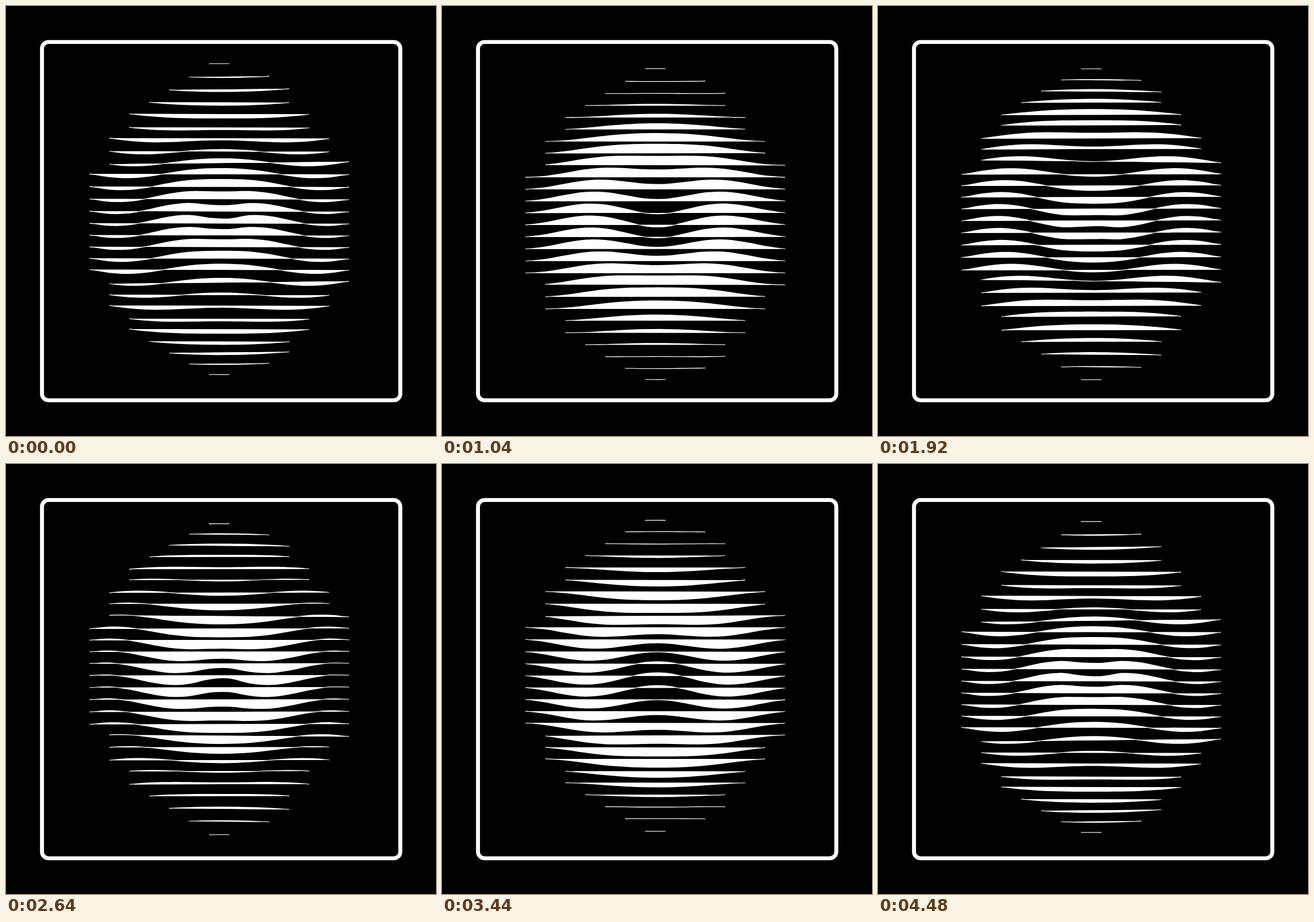
Write an HTML page without scripts that moves like this. It is 748x748 px and loops after 4520 ms.

```html
<!DOCTYPE html>
<html lang="en">
<head>
<meta charset="utf-8">
<title>Ripple lines</title>
<style>
@property --t { syntax: "<angle>"; inherits: true; initial-value: 0deg; }
@property --c0 { syntax: "<length>"; inherits: true; initial-value: 0px; }
@property --c1 { syntax: "<length>"; inherits: true; initial-value: 0px; }
@property --c2 { syntax: "<length>"; inherits: true; initial-value: 0px; }
@property --c3 { syntax: "<length>"; inherits: true; initial-value: 0px; }
@property --c4 { syntax: "<length>"; inherits: true; initial-value: 0px; }
@property --c5 { syntax: "<length>"; inherits: true; initial-value: 0px; }
@property --c6 { syntax: "<length>"; inherits: true; initial-value: 0px; }
@property --c7 { syntax: "<length>"; inherits: true; initial-value: 0px; }
@property --c8 { syntax: "<length>"; inherits: true; initial-value: 0px; }
@property --c9 { syntax: "<length>"; inherits: true; initial-value: 0px; }
@property --c10 { syntax: "<length>"; inherits: true; initial-value: 0px; }
@property --c11 { syntax: "<length>"; inherits: true; initial-value: 0px; }
@property --c12 { syntax: "<length>"; inherits: true; initial-value: 0px; }
@property --c13 { syntax: "<length>"; inherits: true; initial-value: 0px; }
@property --left { syntax: "<length>"; inherits: true; initial-value: 0px; }
@property --right { syntax: "<length>"; inherits: true; initial-value: 0px; }

html, body { margin: 0; width: 100%; height: 100%; overflow: hidden; background: #000; }
body { position: relative; animation: ripple 4520ms steps(113) infinite; }
@keyframes ripple { from { --t: 0deg; } to { --t: 360deg; } }

svg { position: absolute; left: 0; top: 0; }
rect { fill: none; stroke: #fff; stroke-width: 6.9px; }

/* One row: n = row number, f and l = first and last column */
i {
  --y: calc((var(--n) - 13) * 20.8);
  --k: .02523rad;
  --amp: .0173px;
  --xf: calc(var(--f) * 34.68 - 228.5);
  --xl: calc(var(--l) * 34.68 - 228.5);
  position: absolute; left: 145.5px; width: 450.84px; height: 60px;
  top: calc(344.2px + var(--y) * 1px);
  clip-path: inset(0 calc((13 - var(--l)) * 34.68px - .4px) 0 calc(var(--f) * 34.68px - .4px));

  /* Height of the wave at each column, fading with distance */
  --c0: calc(30px + (648 - hypot(-228.5, var(--y))) * var(--amp) * sin(var(--t) - var(--k) * hypot(-228.5, var(--y))));
  --c1: calc(30px + (648 - hypot(-193.82, var(--y))) * var(--amp) * sin(var(--t) - var(--k) * hypot(-193.82, var(--y))));
  --c2: calc(30px + (648 - hypot(-159.14, var(--y))) * var(--amp) * sin(var(--t) - var(--k) * hypot(-159.14, var(--y))));
  --c3: calc(30px + (648 - hypot(-124.46, var(--y))) * var(--amp) * sin(var(--t) - var(--k) * hypot(-124.46, var(--y))));
  --c4: calc(30px + (648 - hypot(-89.78, var(--y))) * var(--amp) * sin(var(--t) - var(--k) * hypot(-89.78, var(--y))));
  --c5: calc(30px + (648 - hypot(-55.1, var(--y))) * var(--amp) * sin(var(--t) - var(--k) * hypot(-55.1, var(--y))));
  --c6: calc(30px + (648 - hypot(-20.42, var(--y))) * var(--amp) * sin(var(--t) - var(--k) * hypot(-20.42, var(--y))));
  --c7: calc(30px + (648 - hypot(14.26, var(--y))) * var(--amp) * sin(var(--t) - var(--k) * hypot(14.26, var(--y))));
  --c8: calc(30px + (648 - hypot(48.94, var(--y))) * var(--amp) * sin(var(--t) - var(--k) * hypot(48.94, var(--y))));
  --c9: calc(30px + (648 - hypot(83.62, var(--y))) * var(--amp) * sin(var(--t) - var(--k) * hypot(83.62, var(--y))));
  --c10: calc(30px + (648 - hypot(118.3, var(--y))) * var(--amp) * sin(var(--t) - var(--k) * hypot(118.3, var(--y))));
  --c11: calc(30px + (648 - hypot(152.98, var(--y))) * var(--amp) * sin(var(--t) - var(--k) * hypot(152.98, var(--y))));
  --c12: calc(30px + (648 - hypot(187.66, var(--y))) * var(--amp) * sin(var(--t) - var(--k) * hypot(187.66, var(--y))));
  --c13: calc(30px + (648 - hypot(222.34, var(--y))) * var(--amp) * sin(var(--t) - var(--k) * hypot(222.34, var(--y))));
  --left: calc(30px + (648 - hypot(var(--xf), var(--y))) * var(--amp) * sin(var(--t) - var(--k) * hypot(var(--xf), var(--y))));
  --right: calc(30px + (648 - hypot(var(--xl), var(--y))) * var(--amp) * sin(var(--t) - var(--k) * hypot(var(--xl), var(--y))));
}

/* Curve with two spline points per column gap, closed by the straight chord.
   Two copies move only the curve up and down, which gives it a stroke. */
i::before, i::after {
  --p: .77778; --q: .33333; --r: -.07407; --s: -.03704;
  content: ""; position: absolute; left: -1px; width: 100%; height: 100%;
  padding: 0 1px;
  font-size: 11.56px; background: #fff;
  clip-path: polygon(
    0em var(--c0),
    calc(1em + 1px) calc(var(--r)*var(--c0) + var(--p)*var(--c0) + var(--q)*var(--c1) + var(--s)*var(--c2)),
    calc(2em + 1px) calc(var(--s)*var(--c0) + var(--q)*var(--c0) + var(--p)*var(--c1) + var(--r)*var(--c2)),
    calc(3em + 1px) var(--c1),
    calc(4em + 1px) calc(var(--r)*var(--c0) + var(--p)*var(--c1) + var(--q)*var(--c2) + var(--s)*var(--c3)),
    calc(5em + 1px) calc(var(--s)*var(--c0) + var(--q)*var(--c1) + var(--p)*var(--c2) + var(--r)*var(--c3)),
    calc(6em + 1px) var(--c2),
    calc(7em + 1px) calc(var(--r)*var(--c1) + var(--p)*var(--c2) + var(--q)*var(--c3) + var(--s)*var(--c4)),
    calc(8em + 1px) calc(var(--s)*var(--c1) + var(--q)*var(--c2) + var(--p)*var(--c3) + var(--r)*var(--c4)),
    calc(9em + 1px) var(--c3),
    calc(10em + 1px) calc(var(--r)*var(--c2) + var(--p)*var(--c3) + var(--q)*var(--c4) + var(--s)*var(--c5)),
    calc(11em + 1px) calc(var(--s)*var(--c2) + var(--q)*var(--c3) + var(--p)*var(--c4) + var(--r)*var(--c5)),
    calc(12em + 1px) var(--c4),
    calc(13em + 1px) calc(var(--r)*var(--c3) + var(--p)*var(--c4) + var(--q)*var(--c5) + var(--s)*var(--c6)),
    calc(14em + 1px) calc(var(--s)*var(--c3) + var(--q)*var(--c4) + var(--p)*var(--c5) + var(--r)*var(--c6)),
    calc(15em + 1px) var(--c5),
    calc(16em + 1px) calc(var(--r)*var(--c4) + var(--p)*var(--c5) + var(--q)*var(--c6) + var(--s)*var(--c7)),
    calc(17em + 1px) calc(var(--s)*var(--c4) + var(--q)*var(--c5) + var(--p)*var(--c6) + var(--r)*var(--c7)),
    calc(18em + 1px) var(--c6),
    calc(19em + 1px) calc(var(--r)*var(--c5) + var(--p)*var(--c6) + var(--q)*var(--c7) + var(--s)*var(--c8)),
    calc(20em + 1px) calc(var(--s)*var(--c5) + var(--q)*var(--c6) + var(--p)*var(--c7) + var(--r)*var(--c8)),
    calc(21em + 1px) var(--c7),
    calc(22em + 1px) calc(var(--r)*var(--c6) + var(--p)*var(--c7) + var(--q)*var(--c8) + var(--s)*var(--c9)),
    calc(23em + 1px) calc(var(--s)*var(--c6) + var(--q)*var(--c7) + var(--p)*var(--c8) + var(--r)*var(--c9)),
    calc(24em + 1px) var(--c8),
    calc(25em + 1px) calc(var(--r)*var(--c7) + var(--p)*var(--c8) + var(--q)*var(--c9) + var(--s)*var(--c10)),
    calc(26em + 1px) calc(var(--s)*var(--c7) + var(--q)*var(--c8) + var(--p)*var(--c9) + var(--r)*var(--c10)),
    calc(27em + 1px) var(--c9),
    calc(28em + 1px) calc(var(--r)*var(--c8) + var(--p)*var(--c9) + var(--q)*var(--c10) + var(--s)*var(--c11)),
    calc(29em + 1px) calc(var(--s)*var(--c8) + var(--q)*var(--c9) + var(--p)*var(--c10) + var(--r)*var(--c11)),
    calc(30em + 1px) var(--c10),
    calc(31em + 1px) calc(var(--r)*var(--c9) + var(--p)*var(--c10) + var(--q)*var(--c11) + var(--s)*var(--c12)),
    calc(32em + 1px) calc(var(--s)*var(--c9) + var(--q)*var(--c10) + var(--p)*var(--c11) + var(--r)*var(--c12)),
    calc(33em + 1px) var(--c11),
    calc(34em + 1px) calc(var(--r)*var(--c10) + var(--p)*var(--c11) + var(--q)*var(--c12) + var(--s)*var(--c13)),
    calc(35em + 1px) calc(var(--s)*var(--c10) + var(--q)*var(--c11) + var(--p)*var(--c12) + var(--r)*var(--c13)),
    calc(36em + 1px) var(--c12),
    calc(37em + 1px) calc(var(--r)*var(--c11) + var(--p)*var(--c12) + var(--q)*var(--c13) + var(--s)*var(--c13)),
    calc(38em + 1px) calc(var(--s)*var(--c11) + var(--q)*var(--c12) + var(--p)*var(--c13) + var(--r)*var(--c13)),
    100% var(--c13),
    100% calc(var(--right) - var(--o)),
    calc(var(--l) * 3em + 1px) calc(var(--right) - var(--o)),
    calc(var(--f) * 3em + 1px) calc(var(--left) - var(--o)),
    0em calc(var(--left) - var(--o)));
  top: var(--o);
}
i::before { --o: -.65px; }
i::after { --o: .65px; }
</style>
</head>
<body>
<svg width="748" height="748"><rect x="62.6" y="62.6" width="623.3" height="623.3" rx="11.5"/></svg>
<i style="--n:0;--f:6;--l:7"></i>
<i style="--n:1;--f:5;--l:9"></i>
<i style="--n:2;--f:4;--l:10"></i>
<i style="--n:3;--f:3;--l:10"></i>
<i style="--n:4;--f:2;--l:11"></i>
<i style="--n:5;--f:2;--l:11"></i>
<i style="--n:6;--f:1;--l:12"></i>
<i style="--n:7;--f:1;--l:12"></i>
<i style="--n:8;--f:1;--l:13"></i>
<i style="--n:9;--f:0;--l:13"></i>
<i style="--n:10;--f:0;--l:13"></i>
<i style="--n:11;--f:0;--l:13"></i>
<i style="--n:12;--f:0;--l:13"></i>
<i style="--n:13;--f:0;--l:13"></i>
<i style="--n:14;--f:0;--l:13"></i>
<i style="--n:15;--f:0;--l:13"></i>
<i style="--n:16;--f:0;--l:13"></i>
<i style="--n:17;--f:0;--l:13"></i>
<i style="--n:18;--f:1;--l:13"></i>
<i style="--n:19;--f:1;--l:12"></i>
<i style="--n:20;--f:1;--l:12"></i>
<i style="--n:21;--f:2;--l:11"></i>
<i style="--n:22;--f:2;--l:11"></i>
<i style="--n:23;--f:3;--l:10"></i>
<i style="--n:24;--f:4;--l:10"></i>
<i style="--n:25;--f:5;--l:9"></i>
<i style="--n:26;--f:6;--l:7"></i>
</body>
</html>
```
